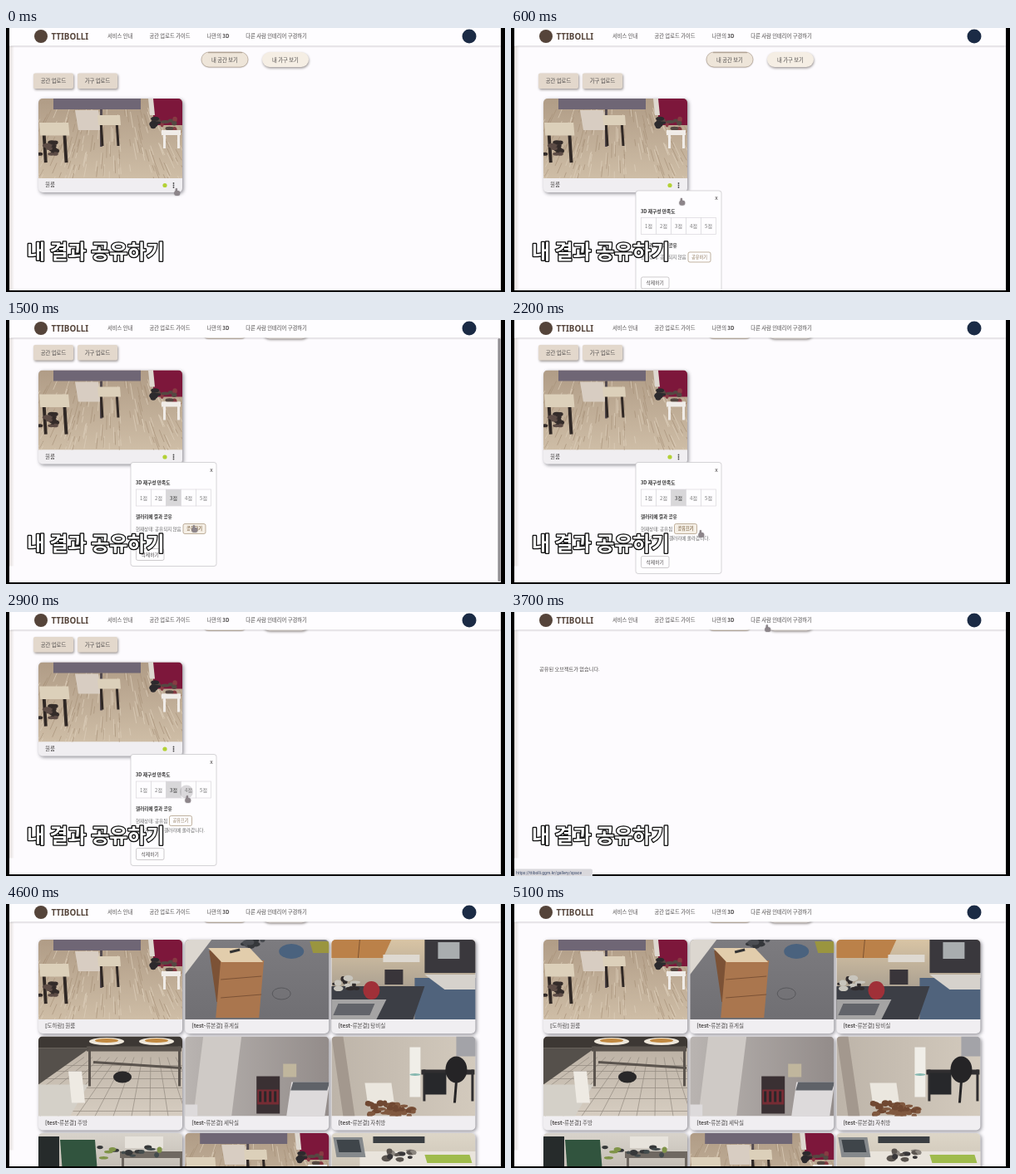
An HTML page with a canvas that plays this animation: 600 by 318 pixels, repeating every 5200 ms.

```html
<!DOCTYPE html>
<html lang="ko">
<head>
<meta charset="utf-8">
<style>
html, body { margin: 0; width: 100%; height: 100%; overflow: hidden; background: #000; }
canvas { display: block; width: 600px; height: 318px; }
</style>
</head>
<body>
<canvas id="stage"></canvas>
<script>
const LOOP = 5200, W = 600, H = 318;
const FONT = '"Noto Sans CJK KR", "Noto Sans CJK JP", "Noto Sans CJK", sans-serif';
const PAGE = '#fdfbfe', INK = '#4d4a4a', BROWN = '#55443a';
const PHOTO_W = 173, PHOTO_H = 96, CARD_H = 113;
const canvas = document.getElementById('stage');
const ctx = canvas.getContext('2d');
const ratio = window.devicePixelRatio || 1;
canvas.width = W * ratio;
canvas.height = H * ratio;

const clamp = v => Math.max(0, Math.min(1, v));
const ease = v => { v = clamp(v); return v * v * (3 - 2 * v); };
const span = (t, from, to) => (t - from) / (to - from);

function seeded(seed) {
  return () => (seed = (seed * 16807) % 2147483647) / 2147483647;
}

function rect(color, x, y, w, h) {
  ctx.fillStyle = color;
  ctx.fillRect(x, y, w, h);
}

// a box whose lower edge is shifted sideways by lean
function block(color, x, y, w, h, lean = 0) {
  ctx.fillStyle = color;
  ctx.beginPath();
  ctx.moveTo(x, y);
  ctx.lineTo(x + w, y);
  ctx.lineTo(x + w + lean, y + h);
  ctx.lineTo(x + lean, y + h);
  ctx.fill();
}

function line(color, width, x1, y1, x2, y2) {
  ctx.strokeStyle = color;
  ctx.lineWidth = width;
  ctx.beginPath();
  ctx.moveTo(x1, y1);
  ctx.lineTo(x2, y2);
  ctx.stroke();
}

function oval(color, x, y, rx, ry = rx) {
  ctx.fillStyle = color;
  ctx.beginPath();
  ctx.ellipse(x, y, rx, ry, 0, 0, 7);
  ctx.fill();
}

function box(x, y, w, h, r, fill, border) {
  ctx.beginPath();
  ctx.roundRect(x, y, w, h, r);
  ctx.fillStyle = fill;
  ctx.fill();
  if (border) {
    ctx.shadowColor = 'transparent';
    ctx.strokeStyle = border;
    ctx.lineWidth = 0.7;
    ctx.stroke();
  }
}

function raised(draw, dx = 1, dy = 1.5, blur = 3, color = 'rgba(60,50,45,.5)') {
  ctx.save();
  Object.assign(ctx, { shadowColor: color, shadowBlur: blur * ratio,
    shadowOffsetX: dx * ratio, shadowOffsetY: dy * ratio });
  draw();
  ctx.restore();
}

// y is the vertical middle of the glyphs
function text(s, x, y, size = 6.3, color = INK, weight = 400, align = 'left') {
  ctx.font = `${weight} ${size}px ${FONT}`;
  ctx.fillStyle = color;
  ctx.textAlign = align;
  ctx.fillText(s, x, y + size * 0.37);
}

// Latin runs are set bold beside regular Hangul
function mixed(s, x, y, size = 6.3) {
  for (const run of s.match(/[!-~]+|[^!-~]+/g) || []) {
    text(run, x, y, size, INK, /[!-~]/.test(run) ? 700 : 400);
    x += ctx.measureText(run).width;
  }
}

function shade(from, to, across = false) {
  const g = ctx.createLinearGradient(0, 0, across ? PHOTO_W : 0, across ? 0 : PHOTO_H);
  g.addColorStop(0, from);
  g.addColorStop(1, to);
  rect(g, 0, 0, PHOTO_W, PHOTO_H);
}

function clutter(seed, x, y, w, h, colors, count = 14) {
  const rnd = seeded(seed);
  for (let i = 0; i < count; i++)
    oval(colors[i % colors.length], x + rnd() * w, y + rnd() * h, 2 + rnd() * 4, 1.5 + rnd() * 2.5);
}

function planks() {
  const rnd = seeded(41);
  for (let i = 0; i < 260; i++) {
    const x = rnd() * 250 - 40, y = 8 + rnd() * 88, len = 6 + rnd() * 14;
    line(rnd() < 0.5 ? '#a8937a' : '#ddcfba', 0.7, x, y, x + (x - 86) * len / 150, y + len);
  }
}

function stool(x, y, size) {
  for (const side of [4, 23])
    line('#302825', 3 * size, x + side * size, y + 6, x + (side + 2) * size, y + 37 * size);
  block('#dcd0ba', x, y, 27 * size, 12 * size, size);
}

function table(color, x, y, w, h, legs) {
  for (const side of [2, w - 4]) block(color, x + side, y, 3, legs);
  block(color, x, y, w, h);
}

function studio() {
  shade('#b09c86', '#cebda6');
  planks();
  block('#7d173b', 138, 0, 36, 32);
  block('#ded8d0', 132, 0, 6, 20, 2);
  block('#6f6675', 18, 0, 105, 13);
  block('#d8cdc2', 44, 14, 28, 24, 4);
  block('#544b50', 74, 13, 3, 45);
  stool(1, 29, 1.3);
  stool(71, 20, 1);
  clutter(7, 2, 52, 20, 16, ['#332b29', '#5d4c46']);
  clutter(19, 138, 24, 28, 18, ['#2c2a2d', '#554842', '#873b43']);
  table('#f0ece8', 148, 38, 23, 6, 22);
}

function lounge() {
  shade('#7c7b7f', '#706f73');
  block('#dcd7d0', 0, 0, 32, 42, -32);
  clutter(5, 72, 0, 32, 8, ['#35373b', '#4b4d52']);
  oval('#4a627e', 128, 14, 15, 9);
  block('#9a953f', 150, 2, 30, 14, 4);
  ctx.strokeStyle = '#58585c';
  ctx.lineWidth = 1;
  ctx.beginPath();
  ctx.ellipse(116, 65, 11, 7, 0, 0, 7);
  ctx.stroke();
  block('#7c5236', 29, 13, 16, 62, 9);
  block('#aa764e', 43, 25, 52, 69, -6);
  for (const y of [46, 68]) line('#7c5236', 1, 43, y + 2, 92, y - 2);
  block('#e2cdac', 28, 10, 50, 17, 16);
  line('#333', 3, 54, 15, 66, 12);
}

function pantry() {
  shade('#d8c4a4', '#8e8a86');
  block('#bb8149', 0, 0, 72, 22, -10);
  line('#7d5331', 1, 34, 0, 32, 22);
  block('#3a383d', 112, 0, 62, 40);
  block('#a9adaf', 128, 3, 26, 20);
  block('#ded9d1', 62, 18, 44, 9);
  block('#50637c', 100, 46, 74, 50);
  block('#d6d2cc', 112, 42, 62, 18, 24);
  block('#3c3e45', 0, 56, 112, 40, -14);
  block('#a5a4a4', 0, 72, 66, 24, -12);
  block('#62646a', 8, 77, 44, 14, -6);
  clutter(11, 4, 46, 26, 16, ['#302b2c', '#c8c5bd']);
  block('#39353a', 64, 36, 22, 18);
  oval('#a03038', 48, 61, 10, 11);
}

function kitchen() {
  shade('#b8ada0', '#d6cdc1');
  for (let i = -6; i < 18; i++) line('#938a80', 0.7, 65 + i * 10, 25, -20 + i * 22, PHOTO_H);
  for (let y = 35, gap = 7; y < PHOTO_H; y += gap, gap += 2) line('#938a80', 0.7, 0, y, PHOTO_W, y);
  block('#3d3834', 0, 0, 174, 14);
  table('#5b544e', 58, 12, 114, 6, 48);
  line('#5b544e', 3, 66, 31, 172, 38);
  for (const x of [82, 142]) {
    oval('#eee7da', x, 6, 21, 4.5);
    oval('#c28a42', x, 5, 14, 2.5);
  }
  block('#55504b', 0, 14, 62, 44, -62);
  block('#d4d0c8', 0, 58, 60, 38, -22);
  block('#eeeae3', 36, 42, 16, 38, 4);
  oval('#292829', 101, 49, 11, 7);
}

function laundry() {
  shade('#b9b4b1', '#938c8a', true);
  block('#cfcac6', 22, 0, 46, 96, -12);
  block('#c0b69d', 118, 33, 16, 16);
  block('#3a3033', 86, 48, 28, 45);
  block('#762c34', 87, 64, 26, 18);
  for (let x = 89; x < 112; x += 6) rect('#2b2629', x, 66, 3, 13);
  block('#dddadb', 128, 55, 46, 41, -6);
  block('#5f6268', 130, 55, 44, 10, -3);
  block('#dddadb', 0, 82, 15, 14);
}

function bedroom() {
  shade('#bdb4a9', '#d3cabd', true);
  block('#a3988e', 0, 0, 14, 96, 14);
  block('#ebe7df', 40, 56, 32, 28, 4);
  block('#a3a3a8', 150, 0, 24, 24);
  table('#302e30', 108, 40, 64, 6, 38);
  block('#27282b', 112, 44, 26, 26);
  oval('#252426', 150, 40, 13, 16);
  line('#252426', 3, 150, 55, 148, 80);
  block('#f0eee8', 94, 13, 13, 60);
  oval('#86b8b0', 100.5, 46, 6.5, 1.5);
  clutter(23, 44, 80, 54, 16, ['#704832', '#80583f'], 40);
}

function workshop() {
  shade('#d8d3cb', '#a9a198');
  block('#262b2b', 0, 4, 25, 42);
  block('#31543e', 26, 8, 42, 40, 3);
  block('#e7e3dc', 104, 4, 46, 14);
  table('#6f6861', 98, 22, 76, 8, 30);
  clutter(31, 74, 16, 76, 14, ['#363839', '#434b4c', '#809448']);
}

function office() {
  shade('#ddd6c8', '#b9aea0');
  block('#e9e4dc', 34, 22, 140, 30);
  block('#3a3e42', 50, 4, 62, 8);
  block('#85898c', 2, 5, 35, 24, 4);
  block('#3f454a', 6, 8, 27, 15, 3);
  block('#9fbb4c', 112, 26, 54, 10, 3);
  clutter(37, 66, 20, 40, 12, ['#5b5550', '#8d8780', '#383638']);
}

const SCENES = [studio, lounge, pantry, kitchen, laundry, bedroom, workshop, studio, office];
const ROOMS = ['원룸', '휴게실', '탕비실', '주방', '세탁실', '자취방'];

function card(x, y, scene, label) {
  raised(() => box(x, y, PHOTO_W, CARD_H, 5, '#f0eef1'), 1.5, 1.5, 4, 'rgba(50,50,60,.55)');
  ctx.save();
  ctx.beginPath();
  ctx.roundRect(x, y, PHOTO_W, PHOTO_H, [5, 5, 0, 0]);
  ctx.clip();
  ctx.translate(x, y);
  scene();
  ctx.restore();
  mixed(label, x + 8, y + 104, 6.5);
}

function pills(scroll) {
  const y = 29 - scroll;
  raised(() => box(235, y, 56, 18, 9, '#eee5d9', '#b9aa9a'), 0, 0.5, 1.5);
  line('#a99b8c', 1, 243, y + 0.7, 284, y + 0.7);
  text('내 공간 보기', 263, y + 9.5, 6.3, INK, 400, 'center');
  raised(() => box(308, y, 56, 18, 9, '#f5eee4'), 0.5, 1.5, 3);
  text('내 가구 보기', 336, y + 9.5, 6.3, INK, 400, 'center');
}

function uploads(scroll) {
  ['공간 업로드', '가구 업로드'].forEach((label, i) => {
    const x = 33 + i * 53, y = 54.5 - scroll;
    raised(() => box(x, y, 48, 18.5, 2, '#e3d8cc'));
    text(label, x + 24, y + 9.5, 6.3, INK, 400, 'center');
  });
}

function popup(t, top) {
  const shared = t >= 1700;
  raised(() => box(150, top, 103, shared ? 134 : 125, 3, '#fefdff', '#c9c7cb'), 0, 0, 1, 'rgba(0,0,0,.15)');
  text('x', 247, top + 8.5, 7, INK, 400, 'center');
  text('3D 재구성 만족도', 156, top + 24.5, 5.7, '#333', 700);
  for (let i = 0; i < 5; i++) {
    const x = 156.5 + i * 18, chosen = i === 2 && t >= 800;
    rect(chosen ? '#d8d7d9' : '#fefdff', x, top + 32.5, 18, 20);
    ctx.strokeStyle = '#dad8dc';
    ctx.lineWidth = 0.7;
    ctx.strokeRect(x, top + 32.5, 18, 20);
    text(`${i + 1}점`, x + 9, top + 43, 6, chosen ? '#333' : '#777', chosen ? 500 : 400, 'center');
  }
  if (t >= 2700 && t < 3150) oval('rgba(110,108,112,.25)', 217, top + 45, 8);
  text('갤러리에 결과 공유', 156, top + 65.5, 5.6, '#333', 700);
  text(shared ? '현재상태: 공유됨' : '현재상태: 공유되지 않음', 156, top + 80, 5.5, '#666');
  const bx = shared ? 196.5 : 213;
  const hot = t > 1400 && t < 2400;
  box(bx, top + 74, 27, 12, 2, hot ? '#f5efe6' : '#fefdff', '#a59176');
  text(shared ? '공유끄기' : '공유하기', bx + 13.5, top + 80, 5.2, '#8a7355', hot ? 700 : 400, 'center');
  if (shared) text('결과가 모두의 갤러리에 올라갑니다.', 156.5, top + 91, 5.6, '#666');
  const by = top + (shared ? 113 : 104);
  box(156.5, by, 33.5, 14, 2, '#fefdff', '#b9b6b8');
  text('삭제하기', 173.2, by + 7, 5.8, INK, 400, 'center');
}

function myRoom(t, scroll) {
  uploads(scroll);
  const y = 85 - scroll;
  card(39, y, studio, ROOMS[0]);
  oval('#b3d135', 191, y + 104.5, 2.6);
  for (let i = -1; i < 2; i++) oval('#4a484a', 201.5, y + 104.5 + i * 2.5, 0.9);
  if (t >= 200) popup(t, 196 - scroll);
}

function gallery() {
  SCENES.forEach((scene, i) => {
    const owner = i ? 'test-류본결' : '도하람';
    const label = ROOMS[i] ? `[${owner}] ${ROOMS[i]}` : '';
    card(39 + (i % 3) * 176.2, 43 + Math.floor(i / 3) * 116.5, scene, label);
  });
}

function header() {
  raised(() => rect('#fefdff', 4, 0, 591, 21.5), 0, 0.5, 2, 'rgba(70,60,70,.35)');
  oval(BROWN, 42, 10, 8);
  ctx.font = '700 9.8px "Noto Sans", sans-serif';
  ctx.fillStyle = BROWN;
  ctx.textAlign = 'left';
  ctx.fillText('TTIBOLLI', 54.5, 13.5);
  let x = 122;
  for (const item of ['서비스 안내', '공간 업로드 가이드', '나만의 3D', '다른 사람 인테리어 구경하기']) {
    mixed(item, x, 10);
    ctx.font = `400 6.3px ${FONT}`;
    x += ctx.measureText(item).width + 20;
  }
  oval('#1b2b45', 557, 10, 8.5);
}

// arrival time and place of each pointer stop
const STOPS = [[0, 205, 194], [850, 205, 222], [1500, 226, 248], [2150, 228, 254],
  [2750, 218, 222], [3450, 308, 16], [4100, 306, 21]];
const TRAVEL = 450;

function pointer(t) {
  let x = 0, y = 0;
  for (const [arrival, px, py] of STOPS) {
    const k = ease(span(t, arrival - TRAVEL, arrival));
    x += (px - x) * k;
    y += (py - y) * k;
  }
  raised(() => {
    box(x - 1.2, y - 1, 2.2, 6, 1.1, '#8d858a');
    box(x - 2.6, y + 2, 6.8, 5.6, 2.5, '#8d858a');
  }, 0, 0.3, 1.2, 'rgba(50,45,50,.6)');
}

function statusBar() {
  box(4, 309.5, 94, 10, [0, 2, 0, 0], '#d9d8dc');
  ctx.font = '5px Roboto, sans-serif';
  ctx.fillStyle = '#39496a';
  ctx.textAlign = 'left';
  ctx.fillText('https://ttibolli.ggm.kr/gallery/space', 6, 315.6);
}

function title(alpha) {
  ctx.save();
  ctx.globalAlpha = alpha;
  ctx.font = `700 24px ${FONT}`;
  ctx.textAlign = 'left';
  ctx.lineJoin = 'round';
  ctx.lineWidth = 2.6;
  ctx.strokeStyle = '#111';
  ctx.strokeText('내 결과 공유하기', 25, 278);
  ctx.fillStyle = '#fff';
  ctx.fillText('내 결과 공유하기', 25, 278);
  ctx.restore();
}

function draw(t) {
  const scroll = 24.5 * ease(span(t, 600, 900));
  ctx.setTransform(ratio, 0, 0, ratio, 0, 0);
  rect(PAGE, 0, 0, W, H);
  const edge = ctx.createLinearGradient(4, 0, 10, 0);
  edge.addColorStop(0, '#e2dcd9');
  edge.addColorStop(1, PAGE);
  rect(edge, 4, 22, 6, 299 - scroll);
  pills(scroll);
  if (t < 3600) myRoom(t, scroll);
  else if (t < 3900) text('공유된 오브젝트가 없습니다.', 34, 69, 6.2);
  else gallery();
  header();
  if (t >= 700 && t < 1600) box(591.5, 22, 3, 293, 1.5, '#8c898d');
  rect('#000', 0, 0, 4, H);
  rect('#000', 595, 0, 5, H);
  rect('#000', 0, 316, W, 2);
  if (t >= 3400 && t < 4500) statusBar();
  if (t < 4400) pointer(t);
  const alpha = 1 - clamp(span(t, 4100, 4500));
  if (alpha > 0) title(alpha);
}

const start = performance.now();
function tick() {
  draw(Math.max(0, performance.now() - start) % LOOP);
  requestAnimationFrame(tick);
}
tick();
</script>
</body>
</html>
```
